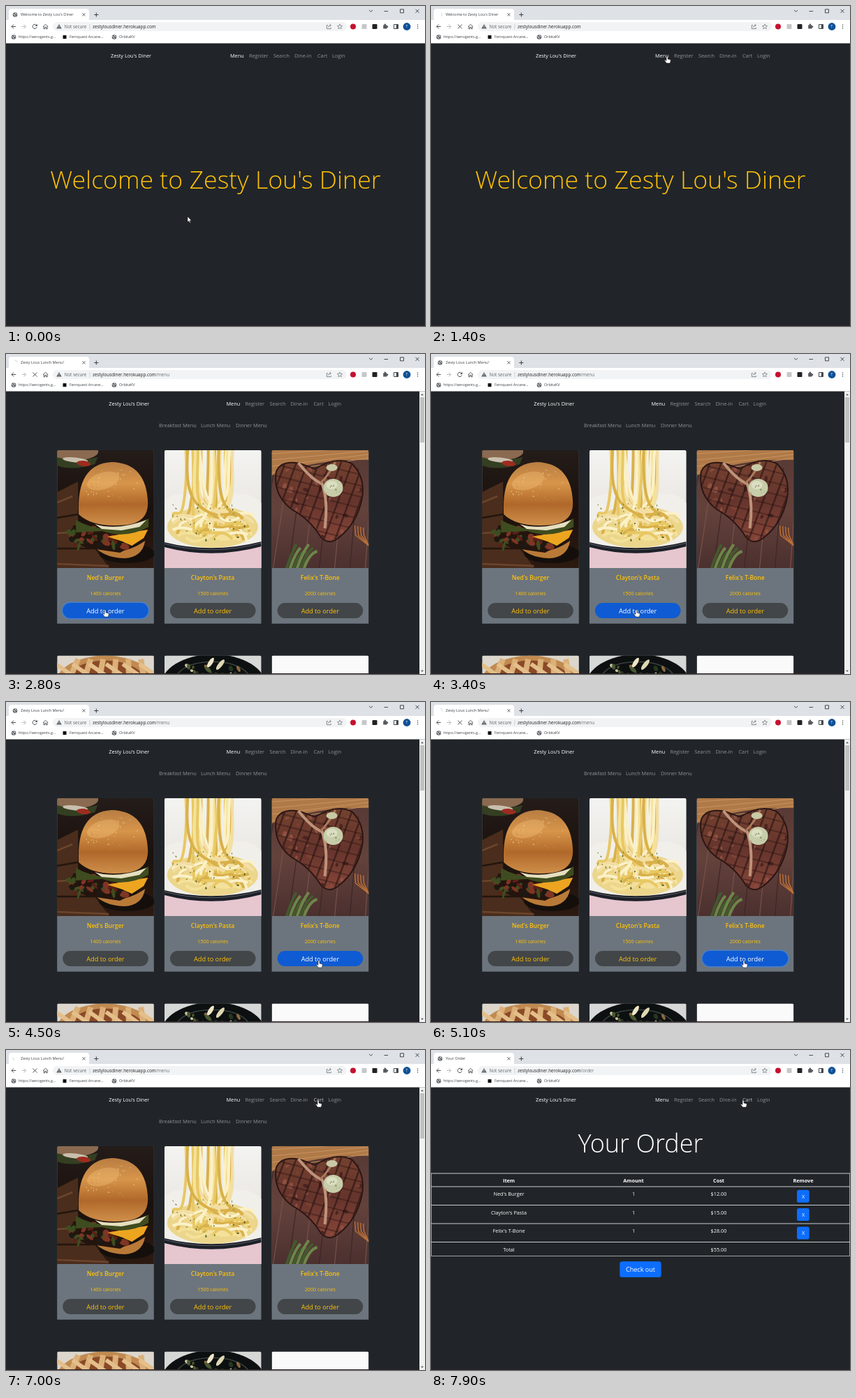
Write an HTML page with a canvas that moves like this. It is 600 px wide and 459 px high and loops after 8000 ms.

```html
<!DOCTYPE html>
<html lang="en">
<head>
<meta charset="utf-8">
<title>Diner order demo</title>
<style>
html, body { margin: 0; width: 100%; height: 100%; overflow: hidden; background: #212529; }
canvas { display: block; width: 600px; height: 459px; }
</style>
</head>
<body>
<canvas id="stage"></canvas>
<script>
const canvas = document.getElementById('stage');
const g = canvas.getContext('2d');
const scale = Math.max(1, window.devicePixelRatio || 1);
canvas.width = 600 * scale;
canvas.height = 459 * scale;

const LOOP = 8000, MENU_AT = 1500, ORDER_AT = 7400;
const BRAND = "Zesty Lou's Diner", HOST = 'zestylousdiner.herokuapp.com';
const GOLD = '#ffc107', BLUE = '#0d6efd', MUTED = '#8f9294', INK = '#3c4043';
const NAV = [['Menu', 321, 22], ['Register', 348, 30], ['Search', 383, 25],
  ['Dine-in', 413, 27], ['Cart', 446, 16], ['Login', 467, 21]];
const DISHES = [["Ned's Burger", 1400, 12], ["Clayton's Pasta", 1500, 15], ["Felix's T-Bone", 2000, 28]];
// Page loads: start, end, pressed card
const LOADS = [[1000, 1600, -1], [2800, 3200, 0], [3700, 4200, 1], [4700, 5300, 2], [6700, 7500, -1]];
// Pointer tip: time, x, y
const PATH = [[0, 260, 302], [200, 260, 302], [900, 338, 72], [2100, 338, 72], [2600, 142, 367],
  [3000, 142, 367], [3400, 294, 367], [4000, 294, 367], [4400, 448, 371], [5500, 448, 371],
  [6200, 426, 65], [6500, 447, 72], [LOOP, 447, 72]];

function rect(x, y, w, h, color, r = 0) {
  g.fillStyle = color;
  g.beginPath();
  g.roundRect(x, y, w, h, r);
  g.fill();
}
function oval(x, y, rx, ry, color, turn = 0) {
  g.fillStyle = color;
  g.beginPath();
  g.ellipse(x, y, rx, ry, turn, 0, 7);
  g.fill();
}
function draw(d, color, width) {
  const p = new Path2D(d);
  if (width) {
    g.strokeStyle = color;
    g.lineWidth = width;
    g.stroke(p);
  } else {
    g.fillStyle = color;
    g.fill(p);
  }
}
function at(x, y, fn) {
  g.save();
  g.translate(x, y);
  fn();
  g.restore();
}
// y is the middle of the capitals
function text(s, x, y, size, color, align = 'left', weight = 400) {
  g.font = `${weight} ${size}px "Open Sans", "Noto Sans", sans-serif`;
  g.textAlign = align;
  g.fillStyle = color;
  g.fillText(s, x, y + size * .35);
}
function shade(y0, y1, ...colors) {
  const s = g.createLinearGradient(0, y0, 0, y1);
  colors.forEach((c, i) => s.addColorStop(i / (colors.length - 1), c));
  return s;
}
function random(seed) {
  return () => (seed = seed * 16807 % 2147483647) / 2147483647;
}
function specks(n, seed, x, y, w, h, colors, size) {
  const r = random(seed);
  for (let i = 0; i < n; i++)
    oval(x + r() * w, y + r() * h, size * (.4 + r()), size * (.3 + r() * .5), colors[i % colors.length], r() * 3);
}

function burger() {
  rect(0, 0, 139, 169, shade(0, 169, '#241c19', '#1a110d', '#2c1a11'));
  draw('M0 60L30 45V110L75 169H0Z', '#4a2d1c');
  for (let i = 0; i < 5; i++) draw(`M0 ${75 + i * 22}L${22 + i * 13} ${66 + i * 25}`, i % 2 ? '#22150e' : '#6b452c', 2.5);
  oval(22, 2, 37, 13, '#8a6a50');
  draw('M0 10Q28 18 58 10L54 20Q22 30 0 22Z', '#343f22');
  oval(26, 14, 18, 3.5, '#c9bfae', .1);
  oval(38, 19, 10, 4, '#9c2c20', .1);
  oval(100, 148, 40, 14, '#150f0c');
  draw('M50 134Q85 158 126 130Q122 154 96 155Q64 154 50 134Z', '#b97a38');
  draw('M23 108Q16 130 42 140L90 147L128 127L131 106Z', '#24140e');
  specks(44, 17, 20, 112, 85, 26, ['#3e4d20', '#5c2016', '#1d1912', '#7e3524'], 6);
  draw('M72 124L110 117L130 114L124 126L107 137L94 131Z', '#eda520');
  draw('M27 100Q70 126 131 98L131 110Q98 128 65 116L27 118Z', '#3f4c1f');
  draw('M54 106Q86 116 128 100L118 110L92 115L64 113Z', '#e6dfbf');
  draw('M31 92Q27 20 78 17Q128 18 130 76Q130 103 100 107Q52 112 31 92Z', shade(17, 108, '#b87d42', '#d7954a', '#b0682a', '#cf8f4a'));
  oval(66, 44, 24, 12, 'rgba(246,199,126,.35)', -.3);
  specks(50, 51, 42, 28, 76, 44, ['#f1d59b', '#c98a45'], 1);
}

function pasta() {
  rect(0, 0, 139, 169, shade(0, 169, '#f3f3f1', '#ebe8e3', '#f0e7e6'));
  draw('M0 135H139V169H0Z', '#e6c6cf');
  draw('M0 72Q10 62 32 62H110Q130 64 139 76V135Q70 152 0 135Z', '#f1efea');
  oval(69, 110, 65, 30, '#ecd68c');
  const r = random(91);
  const tones = ['#f5e29a', '#e8c863', '#fbf1c8', '#d9b04a', '#f3deA4'];
  for (let i = 0; i < 34; i++) {
    const x = 30 + r() * 68, end = 10 + r() * 118, y = 95 + r() * 36;
    draw(`M${x} -3C${x + r() * 10 - 5} 35 ${x + r() * 14 - 7} 70 ${x * .7 + end * .3} 84S${end} ${y - 12} ${end} ${y}`, tones[i % 5], 4);
  }
  for (let i = 0; i < 26; i++) {
    const x = 8 + r() * 92, y = 90 + r() * 38;
    draw(`M${x} ${y}q12 ${-18 + r() * 30} 28 0`, tones[i % 5], 4);
  }
  specks(38, 33, 12, 75, 112, 57, ['#74822e', '#516426', '#a6a34c'], 1.4);
  draw('M0 132Q68 149 139 131V138Q68 157 0 139Z', '#1d2028');
  draw('M0 134Q68 152 139 133', '#777a80', .7);
}

function steak() {
  rect(0, 0, 139, 169, shade(0, 169, '#573833', '#64423c', '#4b302f'));
  for (let i = 0; i < 8; i++) draw(`M${i * 22 - 20} 169L${i * 20 + 4} 25`, i % 2 ? '#775249' : '#3d2725', 1.2);
  draw('M0 0H139V14Q68 11 0 36Z', '#b07a48');
  for (let i = 0; i < 4; i++) draw(`M0 ${i * 9 + 5}L139 ${i * 5 - 4}`, '#c79360', 1);
  const shape = 'M7 32Q13 15 40 20L62 28Q92 9 114 20Q134 40 128 70Q121 104 96 124Q82 136 71 124Q55 98 29 84Q3 64 7 32Z';
  draw(shape, '#2b1614', 4);
  draw(shape, shade(15, 130, '#74412f', '#65342c', '#864539'));
  g.save();
  g.clip(new Path2D(shape));
  specks(60, 29, 5, 15, 125, 115, ['#8f5040', '#4a241f', '#7b4032'], 4);
  for (let i = 0; i < 10; i++) {
    draw(`M${i * 16 - 40} 135L${i * 16 + 8} 5`, 'rgba(38,19,18,.6)', 2.5);
    draw(`M0 ${i * 16 - 13}L139 ${i * 16 + 22}`, 'rgba(38,19,18,.4)', 2);
  }
  g.restore();
  draw('M38 18Q58 43 72 48Q81 72 76 112', '#bd937a', 4);
  draw('M70 47Q82 35 91 17', '#a87a5c', 3);
  oval(88, 54, 14, 13, '#c7cca9');
  oval(86, 50, 8, 6, '#dbdec1');
  oval(86, 25, 8, 5, '#c9c9a5');
  specks(9, 7, 78, 45, 20, 18, ['#869063'], 1.2);
  for (let i = 0; i < 6; i++)
    draw(`M${20 + i * 5} 173Q${28 + i * 5} 148 ${35 + i * 6} ${135 + i % 3 * 5}`, i % 2 ? '#6d8549' : '#43592e', 4);
  for (let i = 0; i < 4; i++) draw(`M${119 + i * 4} ${108 + i}L${120 + i * 4} 122L139 137`, '#bd7137', 1.4);
}

function pie() {
  rect(0, 0, 139, 40, '#dcd6cc');
  oval(69, 40, 71, 40, '#c08a50');
  oval(69, 42, 60, 35, '#8a4a28');
  for (let i = 0; i < 6; i++) {
    draw(`M${15 + i * 22} 40L${30 + i * 18} 5`, '#dcb079', 8);
    draw(`M${i * 24 - 2} 12L${i * 24 + 35} 38`, '#e4bf8a', 6);
  }
}
function skillet() {
  rect(0, 0, 139, 40, '#d5d8d6');
  oval(70, 45, 76, 47, '#0c1011');
  draw('M12 38Q23 9 69 9T127 38', '#3a423c', 1.5);
  specks(30, 23, 32, 14, 76, 24, ['#c9c3a0', '#4b5830', '#8a6a42', '#27361f'], 4);
  oval(66, 10, 8, 3, '#eee6c6', -1);
  oval(80, 13, 9, 3, '#dfd7b1', -.9);
}
function plate() {
  rect(0, 0, 139, 40, '#fbfafb');
}
const PHOTOS = [burger, pasta, steak, pie, skillet, plate];

function photo(i, x, y, h) {
  at(x, y, () => {
    g.beginPath();
    g.roundRect(0, 0, 138.6, h, [2, 2, 0, 0]);
    g.clip();
    PHOTOS[i]();
  });
}

function globe(x, y) {
  oval(x, y, 3.3, 3.3, '#5f6368');
  at(x, y, () => {
    draw('M-2.6 -.9Q-.6 -.5 -.6 .7L.4 2.4M.3 -2.6Q0 -1 2.4 -.4', '#fff', .9);
  });
}

function browser(t, title, path, loading) {
  rect(0, 0, 600, 21, '#dee1e6');
  rect(4, 4, 115, 18, '#fff', [4, 4, 0, 0]);
  rect(0, 20, 600, 33.4, '#fff');
  if (loading) {
    g.strokeStyle = '#c8ccd0';
    g.lineWidth = .8;
    g.beginPath();
    g.arc(13, 12, 3, t / 120, t / 120 + 2);
    g.stroke();
  } else globe(13, 12.5);
  text(title, 21, 12.5, 5.5, INK);
  draw('M109.4 10.4l4 4m0 -4l-4 4', '#45494d', .9);
  draw('M126.3 12.5h6m-3 -3v6', '#3c4043', 1);
  draw('M520 5.8l2.5 2.5l2.5 -2.5M541.5 7.5h5.5M564.5 4.8h5v5h-5zM586.5 4.8l5 5m0 -5l-5 5', '#25282b', .8);

  draw('M14 29.5H8m3 -3l-3 3l3 3', '#4d5156', 1);
  draw('M22.5 29.5h6m-3 -3l3 3l-3 3', '#babcbe', 1);
  if (loading) draw('M38.3 26.5l6 6m0 -6l-6 6', '#4d5156', 1);
  else {
    draw('M43.8 27.7A3.1 3.1 0 1 0 44.2 30.3', '#4d5156', 1);
    draw('M44.8 25.8v3.2h-3.2z', '#4d5156');
  }
  draw('M53 29.6l3.6 -3.3l3.6 3.3M54 29v3.8h1.7v-2.4h1.8v2.4H59.2V29', '#4d5156', .9);
  rect(67, 23, 421, 13, '#f1f3f4', 6.5);
  draw('M76 26l3.8 6.5H72.2Z', '#5f6368');
  draw('M76 28.2v2m0 .6v.8', '#fff', .7);
  text('Not secure', 83.5, 29.5, 6.3, '#5f6368');
  rect(119.6, 26, .7, 7.5, '#bec1c5');
  text(HOST, 124, 29.5, 6.3, '#202124');
  const hostWidth = g.measureText(HOST).width;
  text(path, 124 + hostWidth, 29.5, 6.3, '#6b6f74');
  draw('M461 27.6h-1.7v5h6v-1.7M461.5 30.6q.3 -3 3.5 -3m-1.4 -1.7l1.8 1.7l-1.8 1.7', '#6b6f74', .8);
  draw('M478 25.9l1 2.4l2.6 .2l-2 1.7l.6 2.5l-2.2 -1.3l-2.2 1.3l.6 -2.5l-2 -1.7l2.6 -.2z', '#6b6f74', .7);
  oval(497, 29.5, 4, 4, '#c51230');
  rect(509.5, 26, 7, 7, '#c5c7c9', 1);
  rect(524.5, 26, 7, 7, '#222', 1);
  rect(540.2, 27.2, 5.4, 5.4, '#55595e', .7);
  oval(542.8, 26.8, 1.3, 1.3, '#55595e');
  oval(546, 29.8, 1.3, 1.3, '#55595e');
  draw('M555.5 26.5h6v6h-6z', '#45494d', 1);
  rect(558.8, 26.5, 2.7, 6, '#45494d');
  oval(574, 29.5, 5.4, 5.4, '#0f5096');
  text('T', 574, 29.5, 5, '#fff', 'center');
  for (let i = -1; i < 2; i++) oval(589.5, 29.5 + i * 2.5, .75, .75, '#4d5156');

  globe(11, 44.5);
  text('https://xenogents.g...', 18, 44.5, 5.4, INK);
  rect(81.5, 42, 5, 5, '#111');
  text('Fernquest Arcane...', 91, 44.5, 5.4, INK);
  globe(155, 44.5);
  text('OrbitaKV', 162, 44.5, 5.4, INK);
}

function navbar(shift, brandShift, pointer) {
  text(BRAND, 150 - brandShift, 71.5, 7.3, '#fff');
  NAV.forEach(([name, x, w], i) => {
    const left = x - shift;
    const over = pointer.y > 61 && pointer.y < 82 && pointer.x > left - 4 && pointer.x < left + w + 2;
    text(name, left, 71.5, 7.3, i ? over ? '#c3c5c6' : MUTED : '#fff');
  });
}

function menuPage(pointer, pressed) {
  navbar(5.5, 2.7, pointer);
  text('Breakfast Menu', 219, 102, 7.3, MUTED);
  text('Lunch Menu', 279, 102, 7.3, MUTED);
  text('Dinner Menu', 329, 102, 7.3, MUTED);
  DISHES.forEach(([name, calories], i) => {
    const x = 73.2 + i * 153.7, mid = x + 69.2;
    rect(x, 138, 138.6, 248.7, '#6c757d', [2, 2, 0, 0]);
    photo(i, x, 138, 169);
    text(name, mid, 321, 8.6, GOLD, 'center', 600);
    text(calories + ' calories', mid, 343.5, 7.2, GOLD, 'center');
    const active = pressed === i || overButton(pointer) === i;
    if (pressed === i) rect(x + 6.1, 355.2, 126.4, 25.6, '#4f7dbd', 12.8);
    rect(x + 8, 357, 122.6, 22, active ? '#0f5bd3' : '#424649', 11);
    text('Add to order', mid, 368.3, 9.2, active ? '#fff' : GOLD, 'center');
    photo(i + 3, x, 432.6, 30);
  });
  rect(592, 53.4, 8, 406, '#f1f1f1');
  rect(593, 62, 6, 65, '#c1c1c1');
  draw('M594 59.3l2 -2.3l2 2.3z', '#555');
  draw('M594 453.7l2 2.3l2 -2.3z', '#555');
}

function orderPage(pointer) {
  navbar(0, 0, pointer);
  text('Your Order', 300, 134.3, 36, '#fff', 'center', 300);
  const columns = [111.5, 290, 412, 533];
  const row = (y, cells, weight) =>
    cells.forEach((s, i) => text(s, columns[i], y, 7.3, '#fff', 'center', weight));
  for (const y of [177, 196, 222.5, 249, 275.5, 295.3]) rect(0, y - .4, 600, .8, '#c9cbcd');
  rect(0, 177, .7, 118, '#c9cbcd');
  rect(599.3, 177, .7, 118, '#c9cbcd');
  row(187, ['Item', 'Amount', 'Cost', 'Remove'], 700);
  DISHES.forEach(([name, , cost], i) => {
    const y = 206.7 + i * 26.4;
    row(y, [name, '1', `$${cost}.00`]);
    rect(524, y - 6, 17.7, 18, BLUE, 2.8);
    text('X', 533, y + 3.3, 7.3, '#fff', 'center');
  });
  row(286, ['Total', '', '$55.00']);
  rect(270.3, 303.3, 59.3, 22.8, BLUE, 3.5);
  text('Check out', 300, 315, 9.1, '#fff', 'center');
}

function overButton({ x, y }) {
  if (y < 357 || y > 379) return -1;
  return DISHES.findIndex((_, i) => Math.abs(x - 142.4 - i * 153.7) < 61);
}

function pointerAt(t) {
  const i = PATH.findIndex(p => p[0] > t);
  const [t0, x0, y0] = PATH[i - 1], [t1, x1, y1] = PATH[i];
  const k = (t - t0) / (t1 - t0), e = k * k * (3 - 2 * k);
  return { x: x0 + (x1 - x0) * e, y: y0 + (y1 - y0) * e };
}

function cursor(p, hand) {
  at(p.x, p.y, () => {
    const shape = hand
      ? 'M-1 .6Q0 -.8 1 .6V4L4.7 5Q5.4 5.3 5.2 6.5L4.4 10H-.6L-3.5 6.3Q-3.3 4.8 -1 6.4Z'
      : 'M0 0V8L1.8 6.3L3.1 9L4.4 8.4L3.2 5.8H5.6Z';
    draw(shape, '#fff');
    draw(shape, '#111', .5);
  });
}

function render(t) {
  const pointer = pointerAt(t);
  const load = LOADS.find(([a, b]) => t >= a && t < b);
  const page = t < MENU_AT ? 0 : t < ORDER_AT ? 1 : 2;
  g.setTransform(scale, 0, 0, scale, 0, 0);
  rect(0, 0, 600, 459, '#212529');
  if (page === 0) {
    navbar(0, 0, pointer);
    text('Welcome to ' + BRAND, 300, 249.4, 35.7, GOLD, 'center', 300);
  } else if (page === 1) menuPage(pointer, load ? load[2] : -1);
  else orderPage(pointer);
  rect(0, 458, page === 1 ? 592 : 600, 1, '#302126');
  const title = ['Welcome to ' + BRAND, 'Zesty Lous Lunch Menu!', 'Your Order'][page];
  browser(t, title, ['', '/menu', '/order'][page], !!load);
  const overNav = pointer.y > 61 && pointer.y < 82 && pointer.x > 311 && pointer.x < 490;
  cursor(pointer, overNav || page === 1 && overButton(pointer) >= 0);
}

const start = performance.now();
function frame() {
  const t = (performance.now() - start) % LOOP;
  render(Math.floor(t / 100) * 100);
  requestAnimationFrame(frame);
}
frame();
</script>
</body>
</html>
```
